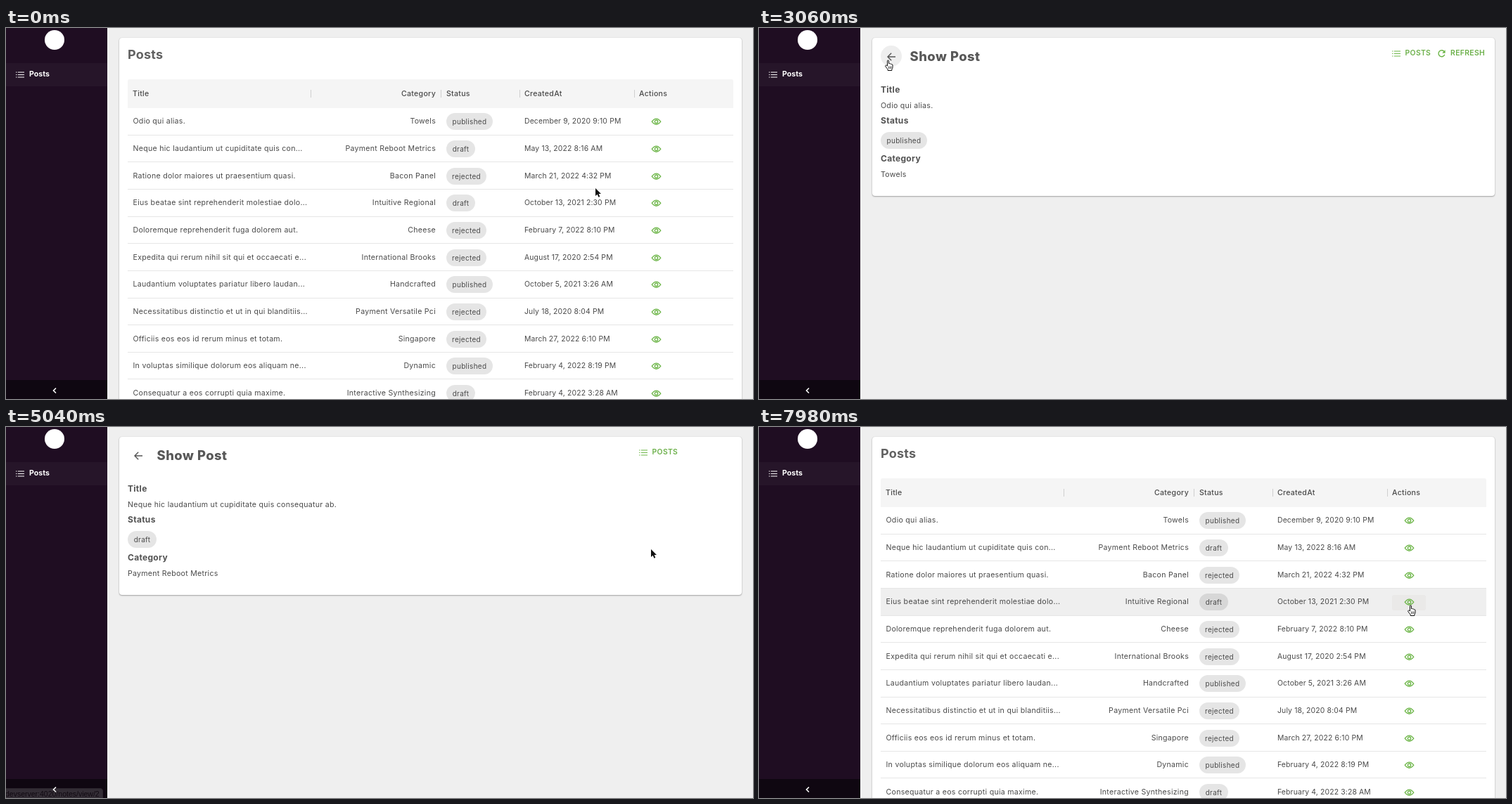
An HTML page for the animation above (8000 ms loop, 1062 by 528 pixels).

```html
<!DOCTYPE html>
<html lang="en">
<head>
<meta charset="utf-8">
<title>Posts admin</title>
<style>
  html, body { margin: 0; width: 100%; height: 100%; overflow: hidden; background: #efefef; }
  #stage { position: relative; width: 1062px; height: 528px; overflow: hidden; background: #efefef;
    font: 400 10.6px/16px Inter, "Open Sans", sans-serif; letter-spacing: .27px; color: #4a4a4a; }
  #stage *, #stage svg { position: absolute; box-sizing: border-box; }
  .text { white-space: nowrap; transform: translateY(-50%); }
  .right { transform: translate(-100%, -50%); }
  .date { font-size: 10.4px; letter-spacing: .15px; }
  .head { font-weight: 500; }
  .label { font-size: 12px; font-weight: 700; letter-spacing: .3px; color: #525252; }
  .heading { font-size: 18px; font-weight: 700; letter-spacing: .2px; color: #616161; }
  .wide { font-size: 18.4px; font-weight: 800; letter-spacing: .5px; color: #585858; }
  .button { font-size: 10.4px; font-weight: 600; letter-spacing: .35px; color: #6cb04a; }
  .menu { font-weight: 700; letter-spacing: 0; color: #fff; }
  .chip { height: 24px; border-radius: 12px; background: rgba(0, 0, 0, .1); text-align: center;
    font-size: 10px; line-height: 24px; letter-spacing: .3px; }
  svg { fill: none; stroke: currentColor; overflow: visible; }
  .green { color: #6cb547; }

  #side { left: 0; top: 0; width: 144px; height: 528px; background: #1f0d22; color: #fff; }
  #logo { left: 55px; top: 3px; width: 28px; height: 28px; border-radius: 50%; background: #fff; }
  #item { left: 0; top: 50px; width: 144px; height: 33px; background: #261529; }
  #fold { left: 0; top: 501px; width: 144px; height: 27px; background: #0f0711; }

  .card { left: 161px; top: 14px; width: 885px; background: #fff; border-radius: 4px;
    box-shadow: 0 1px 2px rgba(0, 0, 0, .32), 0 0 1px rgba(0, 0, 0, .2); }
  #list, #show { left: 0; top: 0; }
  #list .card { height: 540px; }
  #show .card { height: 225px; }
  #thead { left: 173px; top: 73px; width: 861px; height: 41px; background: #f5f5f5; border-radius: 3px 3px 0 0; }
  .split { top: 88px; width: 1px; height: 11px; background: #cfcfcf; }
  .row { left: 173px; width: 861px; height: 38.65px; border-bottom: 1px solid #e6e6e6; }
  .row.hover { background: #efefef; }
  .spot { background: rgba(80, 50, 20, .03); border-radius: 3px; visibility: hidden; }
  .spot.hover { visibility: visible; }
  #back { left: 173px; top: 25px; width: 30px; height: 30px; border-radius: 50%; background: #eee; }
  #toList { left: 894px; top: 25px; width: 66px; height: 22px; background: #f5faf1; }

  #status { left: -3px; top: 514px; height: 16px; padding: 0 4px 0 1px; background: #dcdddc;
    border: 1px solid #b5b5b5; border-radius: 0 4px 0 0; color: #111; white-space: nowrap;
    font: 10.5px/14px "Liberation Sans", Arial, sans-serif; letter-spacing: 0; }
  #cursor { left: 0; top: 0; }
</style>
</head>
<body>
<div id="stage">
  <div id="side">
    <div id="logo"></div>
    <div id="item"></div>
    <div id="fold"></div>
    <svg style="left:66px;top:512px" width="6" height="8" stroke-width="1.6"><path d="M5 .5L1.5 4 5 7.5"/></svg>
  </div>
  <div id="list">
    <div class="card"></div>
    <div id="thead"></div>
  </div>
  <div id="show">
    <div class="card"></div>
    <div id="back" class="spot"></div>
    <div id="toList" class="spot"></div>
    <svg style="left:182px;top:34.5px;color:#555" width="12" height="12" stroke-width="1.4"><path d="M12 6H1M6.2 .8L1 6l5.2 5.2"/></svg>
    <div id="reload">
      <svg class="green" style="left:965px;top:31px" width="11" height="11" stroke-width="1.4"><path d="M9.2 2.6A4.5 4.5 0 1 0 9.8 6.8"/><path d="M10.6 .3V4.8H6.1Z" fill="currentColor" stroke="none"/></svg>
    </div>
  </div>
  <div id="status"></div>
  <div id="cursor">
    <svg id="arrow" width="8" height="13.3" viewBox="0 0 9 15" style="color:#fff"><path d="M0 0V12.5L3 9.8 5 14.3 7.1 13.4 5.2 9H9Z" fill="#111" paint-order="stroke"/></svg>
    <svg id="hand" width="12" height="16" style="left:-5px;top:-.5px;color:#111"><path d="M3.5 8.5V1.5Q3.5 .5 4.5 .5T5.5 1.5V5Q7 4.4 7.5 5.6Q9 5 9.4 6.2Q11 6 11 7.5V10.5Q11 12 9.8 13.5V15H4.2V13.5L.8 9.2Q.2 8 1.3 7.6Q2.3 7.4 3.5 8.5Z" fill="#fff"/><path d="M5.5 9v3.5M7.3 9v3.5M9 9v3.5" stroke-width=".7"/></svg>
  </div>
</div>
<script>
const LOOP = 8000, STEP = 60, TOP = 114, PITCH = 38.65;
const $ = id => document.getElementById(id);
const chipWidth = { published: 66, rejected: 57, draft: 41 };

const posts = [
  ['Odio qui alias.', 'Towels', 'published', 'December 9, 2020 9:10 PM'],
  ['Neque hic laudantium ut cupiditate quis con...', 'Payment Reboot Metrics', 'draft', 'May 13, 2022 8:16 AM'],
  ['Ratione dolor maiores ut praesentium quasi.', 'Bacon Panel', 'rejected', 'March 21, 2022 4:32 PM'],
  ['Eius beatae sint reprehenderit molestiae dolo...', 'Intuitive Regional', 'draft', 'October 13, 2021 2:30 PM'],
  ['Doloremque reprehenderit fuga dolorem aut.', 'Cheese', 'rejected', 'February 7, 2022 8:10 PM'],
  ['Expedita qui rerum nihil sit qui et occaecati e...', 'International Brooks', 'rejected', 'August 17, 2020 2:54 PM'],
  ['Laudantium voluptates pariatur libero laudan...', 'Handcrafted', 'published', 'October 5, 2021 3:26 AM'],
  ['Necessitatibus distinctio et ut in qui blanditiis...', 'Payment Versatile Pci', 'rejected', 'July 18, 2020 8:04 PM'],
  ['Officiis eos eos id rerum minus et totam.', 'Singapore', 'rejected', 'March 27, 2022 6:10 PM'],
  ['In voluptas similique dolorum eos aliquam ne...', 'Dynamic', 'published', 'February 4, 2022 8:19 PM'],
  ['Consequatur a eos corrupti quia maxime.', 'Interactive Synthesizing', 'draft', 'February 4, 2022 3:28 AM']
];

function add(parent, cls, x, y, text = '') {
  const el = document.createElement('div');
  el.className = cls;
  el.style.left = x + 'px';
  el.style.top = y + 'px';
  el.textContent = text;
  parent.append(el);
  return el;
}
const write = (parent, x, y, text, cls = '') => add(parent, 'text ' + cls, x, y, text);

function setChip(el, status) {
  el.textContent = status;
  el.style.width = chipWidth[status] + 'px';
}

function addIcon(parent, x, y, width, height, body, cls) {
  parent.insertAdjacentHTML('beforeend',
    `<svg class="${cls}" style="left:${x}px;top:${y}px" width="${width}" height="${height}" ${body}</svg>`);
}
const listIcon = 'stroke-width="1.2"><path d="M0 1h1.4M2.8 1H12M0 4.5h1.4M2.8 4.5H12M0 8h1.4M2.8 8H12"/>';
const eyeIcon = 'viewBox="0 0 24 24" stroke-width="2.1"><path d="M2 11.5Q12-1.5 22 11.5Q12 24.5 2 11.5Z"/><circle cx="12" cy="11.5" r="3.5"/>';

// Sidebar and list page
const list = $('list'), show = $('show');
addIcon($('side'), 14, 61.5, 13, 9, listIcon, '');
write($('side'), 33, 66, 'Posts', 'menu');
write(list, 173, 37.5, 'Posts', 'heading');
[[180, 'Title'], [611, 'Category', 'right'], [626, 'Status'], [737, 'CreatedAt'], [900, 'Actions']]
  .forEach(([x, text, cls = '']) => write(list, x, 94, text, 'head ' + cls));
[433, 618, 730, 893].forEach(x => { add(list, 'split', x, 88); });

const rows = posts.map(([title, category, status, date], i) => {
  const top = TOP + PITCH * i, mid = top + 19.4;
  const row = add(list, 'row', 173, top);
  const spot = add(list, 'spot', 900, mid - 10.5);
  spot.style.width = '48px';
  spot.style.height = '22px';
  write(list, 180.5, mid, title);
  write(list, 611, mid, category, 'right');
  setChip(add(list, 'chip', 626, mid - 12), status);
  write(list, 737, mid, date, 'date');
  addIcon(list, 916.5, mid - 7, 15, 15, eyeIcon, 'green');
  return { row, spot, mid };
});

// Detail page
write(show, 214.5, 40, 'Show Post', 'heading wide');
[[87.5, 'Title'], [132, 'Status'], [185.5, 'Category']].forEach(([y, text]) => write(show, 173, y, text, 'label'));
const titleText = write(show, 173, 110.5, '');
const categoryText = write(show, 173, 208.5, '');
const statusChip = add(show, 'chip', 173, 147.5);
addIcon(show, 899.5, 31.5, 12, 9, listIcon, 'green');
write(show, 918.5, 36, 'POSTS', 'button');
write($('reload'), 983, 36, 'REFRESH', 'button');

// Pointer legs: start, end, target x, target y, sideways bow
const legs = [
  [100, 740, 922, 135, 0],
  [1740, 2580, 184, 45.5, 20],
  [3420, 4240, 917, 174, 85],
  [5160, 5820, 937, 40, 0],
  [6660, 6900, 939, 50, 0],
  [7020, 7860, 927, 253.5, 0]
];
const visits = [
  { open: 1380, loaded: 1500, close: 3300, title: 'Odio qui alias.', post: posts[0] },
  { open: 4920, loaded: 5100, close: 6600, title: 'Neque hic laudantium ut cupiditate quis consequatur ab.', post: posts[1] }
];
// Link hints: shown, fade start, fade end, address
const hints = [
  [900, 1500, 1700, 'devserver:4020/notes/view/1'],
  [4500, 4900, 5070, 'devserver:4020/notes/view/2'],
  [6060, 6900, 7200, 'devserver:4020/notes']
];

const clamp = v => Math.min(1, Math.max(0, v));
const ease = u => u * u * (3 - 2 * u);

function pointerAt(t) {
  let x = 838, y = 228;
  for (const [start, end, tx, ty, bow] of legs) {
    if (t < start) break;
    const u = ease(clamp((t - start) / (end - start)));
    x += (tx - x) * u;
    y += (ty - y) * u + bow * 4 * u * (1 - u);
  }
  return [x, y];
}

const display = (el, on) => { el.style.display = on ? 'block' : 'none'; };
const hover = (el, on) => { el.classList.toggle('hover', on); return on; };

function draw(t) {
  const [x, y] = pointerAt(t);
  const visit = visits.find(v => t >= v.open && t < v.close);
  let link = false;
  display(list, !visit);
  display(show, visit);

  if (visit) {
    titleText.textContent = visit.title;
    categoryText.textContent = visit.post[1];
    setChip(statusChip, visit.post[2]);
    display($('reload'), t >= visit.loaded);
    const onBack = hover($('back'), Math.hypot(x - 188, y - 40) < 15);
    const onList = hover($('toList'), x > 894 && x < 960 && y > 25 && y < 47);
    link = onBack || onList;
  } else {
    const moved = t > 100;
    rows.forEach(({ row, spot, mid }, i) => {
      const top = TOP + PITCH * i;
      hover(row, moved && y >= top && y < top + PITCH);
      if (hover(spot, moved && Math.abs(x - 924) < 24 && Math.abs(y - mid) < 11)) link = true;
    });
  }

  $('cursor').style.transform = `translate(${x}px, ${y}px)`;
  display($('hand'), link);
  display($('arrow'), !link);

  const hint = hints.find(([from, , to]) => t >= from && t < to);
  display($('status'), hint);
  if (hint) {
    const [, fade, end, address] = hint;
    $('status').textContent = address;
    $('status').style.opacity = 1 - clamp((t - fade) / (end - fade));
  }
}

const begin = performance.now();
function tick() {
  const t = (performance.now() - begin) % LOOP;
  draw(Math.floor(t / STEP) * STEP);
  requestAnimationFrame(tick);
}
tick();
</script>
</body>
</html>
```
